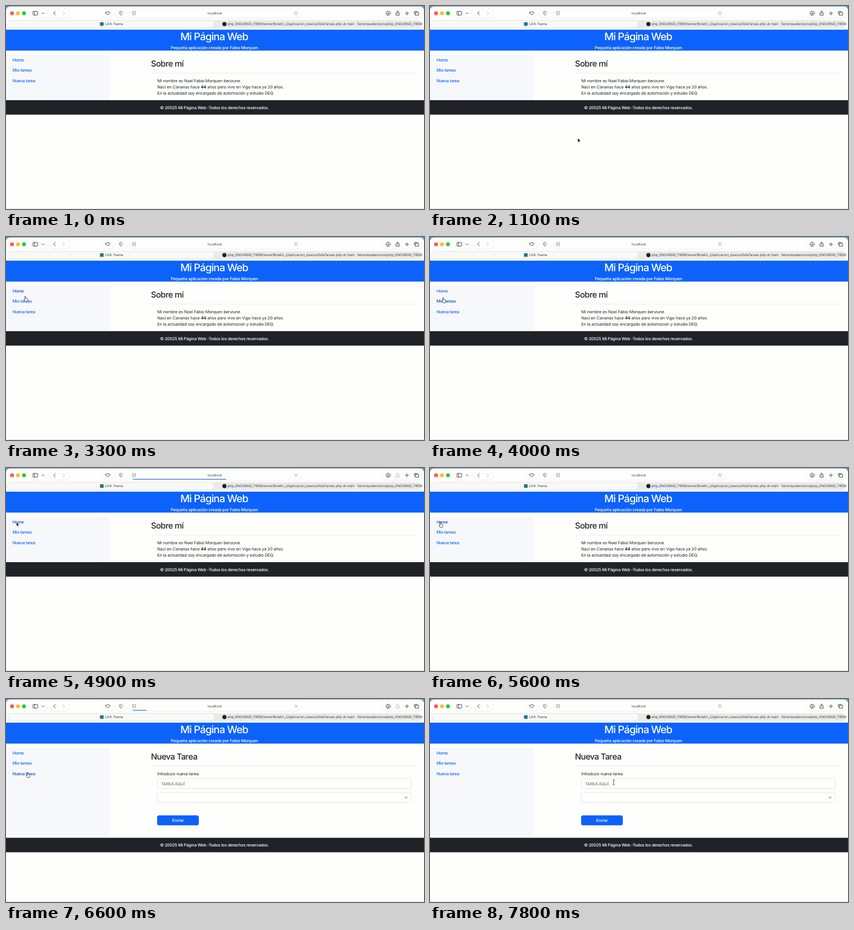
Write an HTML page that moves like this. It is 744 px wide and 362 px high and loops after 8000 ms.

```html
<!DOCTYPE html>
<html lang="es">
<head>
<meta charset="utf-8">
<title>Mi Página Web</title>
<style>
html, body { margin: 0; width: 100%; height: 100%; overflow: hidden; background: #fefffc; }
svg { display: block; width: 100%; height: 100%; }
text { font: 400 7.4px Inter, "Open Sans", sans-serif; letter-spacing: -.14px; fill: #212529;
  font-optical-sizing: none; text-rendering: geometricPrecision; white-space: pre; }
.mid { text-anchor: middle; }
.med { font-weight: 500; letter-spacing: -.2px; }
.white { fill: #fff; }
.h1 { font-size: 18.5px; font-weight: 500; letter-spacing: -.82px; }
.h2 { font-size: 14.8px; font-weight: 500; letter-spacing: -.58px; }
.ui { font-size: 6px; letter-spacing: -.015px; fill: #3c3d3d; }
.link { font-weight: 500; letter-spacing: -.24px; fill: #0c63fb; }
.link.hover { fill: #0a4cc4; }
.icon { fill: none; stroke: #3a3b3b; stroke-width: .9; stroke-linecap: round; stroke-linejoin: round; }
.dim { stroke: #b9bab9; }
.field { fill: #fffffd; stroke: #dee1e4; stroke-width: .8; }
.pill { fill: #fefefd; filter: url(#soft); }
</style>
</head>
<body>
<svg viewBox="0 0 744 362" preserveAspectRatio="none">
  <defs>
    <filter id="soft" x="-10%" y="-40%" width="120%" height="190%">
      <feDropShadow dx="0" dy=".8" stdDeviation="1.8" flood-color="#000" flood-opacity=".09"/>
    </filter>
  </defs>
  <rect width="744" height="12" fill="#6c9dc0"/>
  <path d="M0 362V9Q0 1 8 1H736Q744 1 744 9V362Z" fill="#fefffc"/>
  <rect y="361" width="744" height="1" fill="#e3e4e3"/>

  <g id="toolbar">
    <rect class="pill" x="43" y="5.5" width="30" height="15" rx="7.5"/>
    <rect class="pill" x="78" y="5.5" width="34" height="15" rx="7.5"/>
    <rect class="pill" x="171" y="5.5" width="20" height="15" rx="7.5"/>
    <rect class="pill" x="195" y="5.5" width="20" height="15" rx="7.5"/>
    <rect class="pill" x="220" y="5.5" width="304" height="15" rx="7.5"/>
    <rect class="pill" x="670" y="5.5" width="70" height="15" rx="7.5"/>
    <circle cx="10.8" cy="13" r="3.5" fill="#fb5b57"/>
    <circle cx="21.4" cy="13" r="3.5" fill="#fcbb2d"/>
    <circle cx="32" cy="13" r="3.5" fill="#2bc644"/>
    <g class="icon">
      <rect x="47.9" y="9.7" width="8.6" height="6.6" rx="1.4"/>
      <path d="M50.8 9.7V16.3M64 12.2l2 1.9 2-1.9M87.8 9.8l-3 3.2 3 3.2"/>
      <path d="M177 11.4q4-2.6 8 0q.2 1.8-1.8 2.6l-2.2 1.8-2.2-1.8q-2-.8-1.8-2.6Z"/>
    </g>
    <g class="icon dim">
      <path d="M101.2 9.8l3 3.2-3 3.2"/>
      <path d="M204.8 9.3l3 1.1v2.8q0 2.3-3 3.6-3-1.3-3-3.6v-2.8Z" stroke="#929392"/>
      <path d="M204.8 9.3v7.5q-3-1.3-3-3.6v-2.8Z" fill="#b9bab9" stroke="none"/>
      <path d="M225.4 10h5.2v3.6h-5.2ZM225.4 15.8h2.2M229.4 15.8h1.2" stroke="#8c8d8c"/>
    </g>
    <text class="ui mid" x="371.5" y="15.2">localhost</text>
    <path id="reload" class="icon" style="stroke:#8a8b8a;stroke-width:.7" d="M518.4 12.1a2.5 2.5 0 1 1-1.5-1.3M515.8 9.4l1.3 1.4-1.5 1.1"/>
    <path id="stop" class="icon" style="stroke:#777;stroke-width:.7" d="M514.3 10.8l4.4 4.4M518.7 10.8l-4.4 4.4"/>
    <rect id="bar" x="226" y="19.4" height="1.3" rx=".5" fill="#2f74d8"/>
    <g class="icon">
      <circle cx="680.2" cy="13" r="3.7"/>
      <path d="M680.2 10.9v4M678.7 13.5l1.5 1.5 1.5-1.5"/>
      <path id="share" d="M695.3 12h-1.2v4.6h5.8V12h-1.2M697 14V9M695.5 10.4l1.5-1.6 1.5 1.6"/>
      <path d="M713.7 9.9v6.2M710.6 13h6.2"/>
      <path d="M727 14.2V9.7h5.6M728.8 11.4h5.6v5h-5.6Z"/>
    </g>
  </g>

  <g id="tabs">
    <rect x="2" y="25.3" width="738" height="13.8" rx="6.9" fill="#e9eae9"/>
    <rect x="3" y="26" width="367.5" height="12.4" rx="6.2" fill="#f9faf8" stroke="#dfe0df" stroke-width=".5"/>
    <rect x="167.3" y="29" width="6.4" height="6.4" fill="#2e7183"/>
    <text class="ui" x="176.5" y="34.4">LD4. Faena</text>
    <circle cx="388.8" cy="32.2" r="3.7" fill="#202222"/>
    <text class="ui" x="394.5" y="34.4">php_ENCARGO_TREM/www/Boletin_2/aplicacion_basica/listaTareas.php at main · famorquebenzune/php_ENCARGO_TREM</text>
  </g>

  <rect y="42.2" width="744" height="37.3" fill="#0c62fb"/>
  <text class="h1 mid white" x="370.6" y="60.7">Mi Página Web</text>
  <text class="med mid white" x="371" y="76.6">Pequeña aplicación creada por Fabio Morquen</text>

  <rect id="side" y="87" width="185" fill="#f7f8fb"/>
  <g id="links"></g>
  <text id="heading" class="h2" x="258" y="108.4"></text>
  <path d="M258 119.5H733" stroke="#dfe0de" stroke-width=".6"/>

  <g id="about">
    <text x="269.2" y="135.6">Mi nombre es Noel Fabio Morquen benzune.</text>
    <text x="269.2" y="146.7">Nací en Canarias hace <tspan font-weight="700">44</tspan> años pero vivo en Vigo hace ya 20 años.</text>
    <text x="269.2" y="157.8">En la actualidad soy encargado de automoción y estudio DEQ.</text>
  </g>

  <g id="form">
    <text x="269.2" y="135.6">Introduce nueva tarea</text>
    <rect class="field" x="269.4" y="142" width="452" height="17.5" rx="2.8"/>
    <text x="275.8" y="153.5" style="fill:#5d6267">TAREA AQUÍ</text>
    <rect class="field" x="269.4" y="167" width="452" height="17.5" rx="2.8"/>
    <path class="icon" d="M709.8 174.7l2.3 2.2 2.3-2.2"/>
    <rect x="269" y="207.6" width="74.2" height="17.6" rx="3.5" fill="#0c62fb"/>
    <text class="med mid white" x="306.2" y="219.1">Enviar</text>
  </g>

  <g id="foot">
    <rect width="744" height="25.8" fill="#1f2327"/>
    <text class="med mid white" x="371" y="15.8">© 20025 Mi Página Web -Todos los derechos reservados.</text>
  </g>

  <g id="cursor" stroke-linejoin="round">
    <path id="arrow" d="M0 0V7.3L1.7 5.8 2.8 8.3 4 7.8 2.9 5.3H5.2Z" fill="#050505" stroke="#fff" stroke-width=".6"/>
    <path id="hand" d="M-.9 .7Q-.9 0 -.2 0T.5 .7V3.6Q1.4 3 1.8 3.9 2.7 3.4 3 4.2 4 4 4 5V7Q4 8.4 3.2 9.6H-.5Q-1.2 8.2-2.6 6.6-3.2 5.6-2.2 5.4-1.5 5.4-.9 6.2Z" fill="#fff" stroke="#111" stroke-width=".7"/>
    <path id="beam" d="M-1.7-4.4Q0-4.4 0-3.4 0-4.4 1.7-4.4M0-3.4V3.4M-1.7 4.4Q0 4.4 0 3.4 0 4.4 1.7 4.4" fill="none" stroke="#222" stroke-width=".8"/>
  </g>
</svg>
<script>
const LOOP = 8000, STEP = 100;
const $ = id => document.getElementById(id);
const show = (id, on) => $(id).style.display = on ? '' : 'none';

const links = ['Home', 'Mis tareas', 'Nueva tarea'].map((label, i) => {
  const el = document.createElementNS('http://www.w3.org/2000/svg', 'text');
  el.textContent = label;
  el.setAttribute('x', 11.8);
  el.setAttribute('y', 98.9 + i * 18.5);
  $('links').append(el);
  return el;
});

// time, x, y, pointer shape from that time on
const path = [
  [200, 341, 268, 'arrow'], [300, 340, 271, 'arrow'], [700, 340, 271, 'arrow'],
  [1500, 186, 200, 'arrow'], [1700, 186, 200, 'arrow'], [2100, 88.7, 138.3, 'arrow'],
  [2500, 37, 107, 'hand'], [2800, 34.5, 105.4, 'hand'], [3300, 34.5, 105.4, 'hand'],
  [3700, 39, 143, 'hand'], [4100, 18.6, 96.4, 'hand'], [4700, 18.6, 96.4, 'arrow'],
  [5600, 18.6, 96.4, 'hand'], [6200, 33, 132.4, 'hand'], [6400, 33, 132.4, 'arrow'],
  [6600, 38.6, 130.4, 'hand'], [6700, 55, 132, 'arrow'], [7200, 338, 164, 'arrow'],
  [7400, 335, 157, 'beam'], [7800, 327, 148.5, 'beam']
];
const loads = [4700, 6500];
const barWidths = [8, 24, 166, 190, 216, 252, 296];

function pointerAt(t) {
  const i = path.findLastIndex(p => p[0] <= t);
  if (i < 0) return null;
  const a = path[i], b = path[i + 1] || a;
  const k = b === a ? 0 : (t - a[0]) / (b[0] - a[0]);
  return { x: a[1] + (b[1] - a[1]) * k, y: a[2] + (b[2] - a[2]) * k, kind: a[3] };
}

function render(t) {
  const form = t >= 6600;
  show('about', !form);
  show('form', form);
  $('heading').textContent = form ? 'Nueva Tarea' : 'Sobre mí';
  $('side').setAttribute('height', form ? 156 : 80);
  $('foot').setAttribute('transform', `translate(0 ${form ? 247.5 : 167.9})`);

  const start = loads.find(s => t >= s && t < s + barWidths.length * STEP);
  const busy = start !== undefined;
  $('bar').setAttribute('width', busy ? barWidths[(t - start) / STEP] : 0);
  show('stop', busy);
  show('reload', !busy);
  $('share').setAttribute('class', busy ? 'dim' : '');

  const p = pointerAt(t);
  show('cursor', p);
  const row = p && p.x < 55 ? Math.floor((p.y - 87) / 18.5) : -1;
  links.forEach((el, i) => el.setAttribute('class', i === row ? 'link hover' : 'link'));
  if (!p) return;
  $('cursor').setAttribute('transform', `translate(${p.x} ${p.y})`);
  for (const kind of ['arrow', 'hand', 'beam']) show(kind, kind === p.kind);
}

const origin = performance.now();
function tick() {
  const t = (performance.now() - origin) % LOOP;
  render(Math.floor(t / STEP) * STEP);
  requestAnimationFrame(tick);
}
tick();
</script>
</body>
</html>
```
